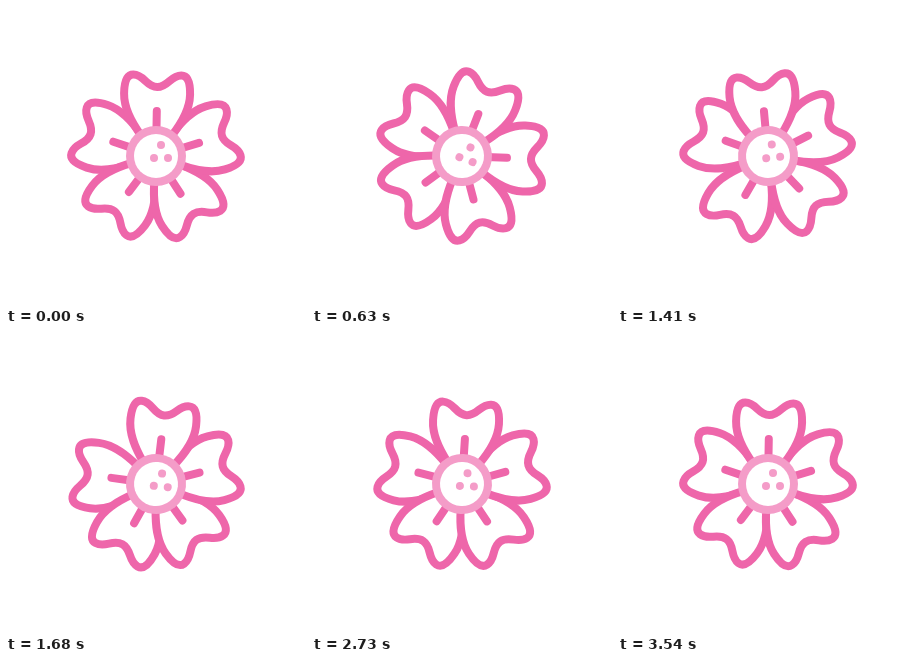
An HTML page with a canvas for the animation above (3.58 s loop, 300 px wide and 300 px high).

```html
<!DOCTYPE html>
<html lang="en">
<head>
<meta charset="utf-8">
<title>Flower</title>
<style>
  html, body { margin: 0; width: 100%; height: 100%; overflow: hidden; background: #fff; }
  canvas { display: block; width: 300px; height: 300px; }
</style>
</head>
<body>
<canvas id="stage" width="300" height="300"></canvas>
<script>
const ctx = document.getElementById('stage').getContext('2d');
const LOOP = 3580, STEP = 30;
const PINK = '#ee66aa', LIGHT = '#f49cc8';

// Sway: a first push, then damped swings; each petal lags the one before.
const FIRST_PEAK = 700, SWING = 525, LAG = 103;
const PEAKS = [20.5, -11, 6.5, -4, 3, 0];

// Resting directions, clockwise from the top petal, in degrees.
const REST = [1, 73, 147, 217, 288.5];

const petal = new Path2D(
  'M-15 -20 C-24 -32 -33 -46 -33 -62 C-33 -74 -30 -81 -24 -81 ' +
  'C-13 -81 -11 -69 0 -69 C11 -69 13 -81 24 -81 ' +
  'C30 -81 33 -74 33 -62 C33 -46 24 -32 15 -20');
const stamen = new Path2D('M0 -24 V-45');

function sway(time, index) {
  const peakTime = FIRST_PEAK + LAG * index;
  if (time < peakTime) return PEAKS[0] * Math.sin(time / peakTime * Math.PI / 2);
  const i = Math.floor((time - peakTime) / SWING);
  if (i >= PEAKS.length - 1) return 0;
  const start = peakTime + i * SWING;
  const end = Math.min(start + SWING, LOOP - STEP);
  const p = Math.min(1, (time - start) / (end - start));
  return PEAKS[i] + (PEAKS[i + 1] - PEAKS[i]) * (1 - Math.cos(Math.PI * p)) / 2;
}

function rotated(degrees, paint) {
  ctx.save();
  ctx.rotate(degrees * Math.PI / 180);
  paint();
  ctx.restore();
}

function disc(x, y, r) {
  ctx.beginPath();
  ctx.arc(x, y, r, 0, Math.PI * 2);
  ctx.fill();
}

function drawPetal() {
  ctx.fillStyle = '#fff';
  ctx.fill(petal);
  ctx.strokeStyle = PINK;
  ctx.lineWidth = 8;
  ctx.stroke(petal);
  ctx.stroke(stamen);
}

function drawCentre() {
  ctx.fillStyle = LIGHT;
  disc(0, 0, 30);
  ctx.fillStyle = '#fff';
  disc(0, 0, 22);
  ctx.fillStyle = LIGHT;
  disc(5, -11, 4);
  disc(-2, 2, 4);
  disc(12, 2, 4);
}

function draw(time) {
  ctx.setTransform(1, 0, 0, 1, 0, 0);
  ctx.fillStyle = '#fff';
  ctx.fillRect(0, 0, 300, 300);
  ctx.translate(150, 150);
  ctx.lineCap = ctx.lineJoin = 'round';
  for (let i = REST.length - 1; i >= 0; i--) {
    rotated(REST[i] + sway(time, i), drawPetal);
  }
  rotated(sway(time, 0), drawCentre);
}

const begin = performance.now();
function tick() {
  const elapsed = (performance.now() - begin) % LOOP;
  draw(Math.min(Math.floor(elapsed / STEP) * STEP, LOOP - 40));
  requestAnimationFrame(tick);
}
tick();
</script>
</body>
</html>
```
